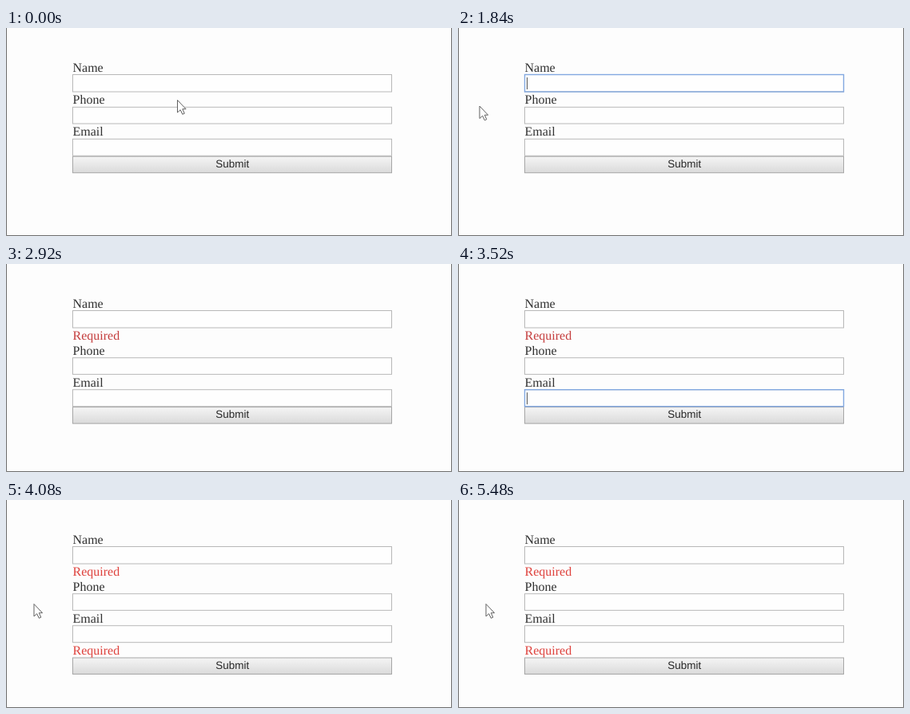
These frames come from a looping animation (558 px wide and 261 px high, 5520 ms). An HTML page:

```html
<!DOCTYPE html>
<html lang="en">
<head>
<meta charset="utf-8">
<style>
  html, body { margin: 0; width: 100%; height: 100%; overflow: hidden; background: #fdfdfd; }
  svg { display: block; width: 558px; height: 261px; }
  text { font: 16px "Liberation Serif", "Times New Roman", serif; fill: #303030; text-rendering: geometricPrecision; }
  .button text { font: 13.5px "Liberation Sans", Arial, sans-serif; fill: #282828; text-anchor: middle; }
  .field { fill: #fefefe; stroke: #b8b8b8; }
  .glow { fill: none; stroke: #82a8e0; stroke-width: 1.4; }
  .caret { stroke: #555; }
</style>
</head>
<body>
<svg viewBox="0 0 558 261">
  <defs>
    <linearGradient id="face" x2="0" y2="1">
      <stop offset="0" stop-color="#f5f5f5"/>
      <stop offset="1" stop-color="#dadada"/>
    </linearGradient>
  </defs>
  <rect width="558" height="261" fill="#fdfdfd"/>
  <path d="M.5 0V260.5H557.5V0" fill="none" stroke="#6c6c6c"/>
  <g id="form"></g>
  <path id="cursor" d="M0 0V15.5L3.7 12.2L6.3 17.8L8.8 16.7L6.3 11.2H10.6Z"
        fill="#fff" stroke="#606060" stroke-linejoin="round"/>
</svg>
<script>
const LOOP = 5520, ROW = 18.4;
const NAME_BLUR = 2200, EMAIL_BLUR = 3960;
const RED_EARLY = "#c43c3c", RED_LATE = "#de403b";

// Pointer stops: time, x, y. It is not drawn while over a text field.
const path = [
  [0, 214, 90], [120, 214, 90], [520, 190, 74], [1160, 150, 72],
  [1600, 26.5, 97.5], [1960, 26.5, 97.5], [2240, 28.5, 101], [2400, 28.5, 101],
  [2840, 110, 166], [3520, 100, 168], [3840, 34.5, 130], [LOOP, 34.5, 130]
];

const form = document.getElementById("form");
const cursor = document.getElementById("cursor");

function make(tag, attrs, parent, content) {
  const node = document.createElementNS("http://www.w3.org/2000/svg", tag);
  for (const key in attrs) node.setAttribute(key, attrs[key]);
  if (content) node.textContent = content;
  return parent.appendChild(node);
}

const group = cls => make("g", { class: cls }, form);
const place = (node, x, y) => node.setAttribute("transform", `translate(${x} ${y})`);
const show = (node, on) => node.setAttribute("visibility", on ? "visible" : "hidden");

function makeField(label, top, height) {
  const g = group("row");
  const box = { x: 83.5, y: top + .5, width: 399, height };
  make("text", { x: 83.5, y: top - 3.5 }, g, label);
  make("rect", { class: "field", ...box }, g);
  const glow = make("rect", { class: "glow", ...box }, g);
  const caret = make("path", { class: "caret", d: `M86.5 ${top + 4}v15` }, g);
  return { g, glow, caret, top, height };
}

const button = group("button");
make("rect", { x: 83.5, y: 161.2, width: 399, height: 20.5, fill: "url(#face)", stroke: "#a6a6a6" }, button);
make("text", { x: 283.2, y: 175 }, button, "Submit");

const nameField = makeField("Name", 58, 21.5);
const phoneField = makeField("Phone", 98.8, 20.7);
const emailField = makeField("Email", 138.8, 21);
const nameError = make("text", { x: 83.5, y: 95.3 }, form, "Required");
const emailError = make("text", { x: 83.5, y: 194.3 }, form, "Required");

function focus(field, t, from, to) {
  const on = t >= from && t < to;
  show(field.glow, on);
  show(field.caret, on && (t - from) % 1000 < 500);
}

function pointerAt(t) {
  const i = path.findIndex(p => p[0] > t);
  const [t0, x0, y0] = path[i - 1], [t1, x1, y1] = path[i];
  const k = (t - t0) / (t1 - t0), e = k * k * (3 - 2 * k);
  return [x0 + (x1 - x0) * e, y0 + (y1 - y0) * e];
}

function draw(t) {
  const first = t >= NAME_BLUR, second = t >= EMAIL_BLUR;
  const shift = first ? ROW : 0;

  place(phoneField.g, 0, shift);
  place(emailField.g, 0, shift);
  place(button, 0, second ? 2 * ROW : shift);
  show(nameError, first);
  show(emailError, second);
  nameError.style.fill = emailError.style.fill = second ? RED_LATE : RED_EARLY;

  focus(nameField, t, 720, NAME_BLUR);
  focus(phoneField, t, 0, 0);
  focus(emailField, t, 3040, EMAIL_BLUR);

  const [x, y] = pointerAt(t);
  const over = [[nameField, 0], [phoneField, shift], [emailField, shift]].some(([f, dy]) =>
    x > 83 && x < 483 && y > f.top + dy && y < f.top + dy + f.height);
  place(cursor, x + .5, y + .5);
  show(cursor, !over);
}

const start = performance.now();
function tick() {
  draw((performance.now() - start) % LOOP);
  requestAnimationFrame(tick);
}
tick();
</script>
</body>
</html>
```
